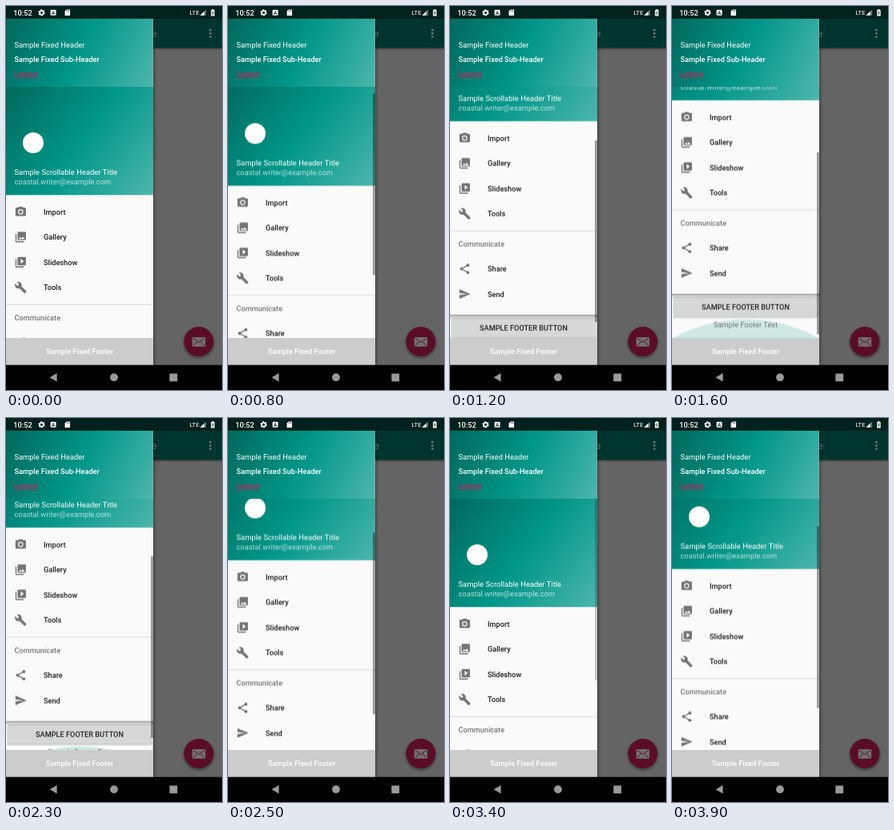
Recreate the animation shown at these times as an HTML page. Size 270 by 480 pixels, loop 4.1 s.

```html
<!DOCTYPE html>
<html lang="en">
<head>
<meta charset="utf-8">
<title>Navigation drawer</title>
<style>
  html, body { margin: 0; width: 100%; height: 100%; overflow: hidden; background: #000; }
  svg { display: block; width: 270px; height: 480px; font: 400 9.3px Roboto, Arial, sans-serif; }
  .med { font-weight: 500; font-size: 9.2px; }
  .mid { text-anchor: middle; }
  .link { text-decoration: underline; text-decoration-thickness: 1px; text-underline-offset: .6px; }
</style>
</head>
<body>
<svg viewBox="0 0 270 480" xmlns="http://www.w3.org/2000/svg">
  <defs>
    <linearGradient id="fixedFill" gradientUnits="userSpaceOnUse" x1="0" y1="16" x2="184" y2="101">
      <stop offset="0" stop-color="#00695c"/><stop offset=".5" stop-color="#009688"/><stop offset="1" stop-color="#4db6ac"/>
    </linearGradient>
    <linearGradient id="headFill" gradientUnits="userSpaceOnUse" x1="0" y1="101" x2="184" y2="236">
      <stop offset="0" stop-color="#00695c"/><stop offset=".5" stop-color="#009688"/><stop offset="1" stop-color="#4db6ac"/>
    </linearGradient>
    <linearGradient id="fade" x1="0" y1="0" x2="0" y2="1">
      <stop offset="0" stop-opacity=".36"/><stop offset="1" stop-opacity="0"/>
    </linearGradient>
    <linearGradient id="edge">
      <stop offset="0" stop-opacity=".28"/><stop offset="1" stop-opacity="0"/>
    </linearGradient>
    <radialGradient id="glow">
      <stop offset=".8" stop-opacity=".35"/><stop offset="1" stop-opacity="0"/>
    </radialGradient>
    <clipPath id="view"><rect y="101" width="183.75" height="314"/></clipPath>
  </defs>

  <!-- dimmed screen -->
  <rect y="15.75" width="270" height="434" fill="#646464"/>
  <rect y="15.75" width="270" height="36.75" fill="#00352f"/>
  <rect y="52.5" width="270" height="3" fill="url(#fade)"/>
  <text x="188.5" y="39" fill="#666" text-anchor="end" style="font-size:13.1px;font-weight:500">e</text>
  <g fill="#707a78">
    <circle cx="255.5" cy="30.2" r="1.35"/><circle cx="255.5" cy="34.4" r="1.35"/><circle cx="255.5" cy="38.6" r="1.35"/>
  </g>
  <circle cx="241" cy="421" r="21.5" fill="url(#glow)"/>
  <circle cx="241" cy="419.4" r="18.4" fill="#5a0c28"/>
  <rect x="232.8" y="414" width="16.5" height="11.8" rx="1" fill="#707070"/>
  <path d="M234 415.4l7 5 7-5M234 424.8l4.6-5M248 424.8l-4.6-5" fill="none" stroke="#5a0c28" stroke-width="1"/>

  <!-- drawer -->
  <rect x="183.75" y="15.75" width="5" height="433" fill="url(#edge)"/>
  <rect y="15.75" width="183.75" height="433" fill="#fafafa"/>
  <g clip-path="url(#view)">
    <g id="page">
      <circle cx="92" cy="700" r="190" fill="#cfe8e4"/>
      <text class="mid" x="92" y="519.8" fill="#757575">Sample Footer Text</text>
      <rect x="1" y="483" width="182" height="26" rx="2" fill="#000" opacity=".1"/>
      <rect x="2" y="482.5" width="180" height="24.5" rx="1.5" fill="#000" opacity=".14"/>
      <rect x="2" y="482" width="180" height="24" rx="1.5" fill="#d6d7d7"/>
      <text class="med mid" x="92" y="497.7" fill="#212121">SAMPLE FOOTER BUTTON</text>
      <rect y="478" width="184" height="6" fill="url(#fade)"/>
      <rect y="236" width="184" height="242" fill="#fafafa"/>
      <rect y="101" width="184" height="135.3" fill="url(#headFill)"/>
      <circle cx="34" cy="171" r="13" fill="#fff"/>
      <text x="10.5" y="210.6" fill="#fff" style="font-size:9.45px">Sample Scrollable Header Title</text>
      <text x="10.5" y="223.2" fill="#fff" fill-opacity=".72">coastal.writer@example.com</text>
      <rect y="372.8" width="184" height=".8" fill="#d2d2d2"/>
      <text class="med" x="10.5" y="392.9" fill="#757575">Communicate</text>
      <g id="rows"></g>
    </g>
    <rect id="bar" x="181" y="101" width="3" height="227" fill="#000" fill-opacity=".36"/>
  </g>

  <rect y="15.75" width="183.75" height="85.25" fill="url(#fixedFill)"/>
  <g fill="#fff">
    <text x="10.5" y="52">Sample Fixed Header</text>
    <text class="med" x="10.5" y="69.8">Sample Fixed Sub-Header</text>
  </g>
  <text class="med link" x="10.5" y="88.4" fill="#bc2460">Logout</text>
  <rect y="415" width="183.75" height="34" fill="#ccc"/>
  <text class="med mid" x="92" y="435.3" fill="#fff">Sample Fixed Footer</text>

  <!-- system bars -->
  <rect width="270" height="15.75" fill="#00211c"/>
  <g fill="#fff">
    <text class="med" x="9.3" y="11.8">10:52</text>
    <circle cx="44.5" cy="8.3" r="2.5" fill="none" stroke="#fff" stroke-width="1.7"/>
    <circle cx="44.5" cy="8.3" r="3.6" fill="none" stroke="#fff" stroke-width="1.2" stroke-dasharray="1.9 1.87"/>
    <rect x="55.6" y="4.8" width="7" height="7" rx="1"/>
    <path d="M75.6 4.4h4.5v7.6h-6.5v-5.4z"/>
    <text x="229.4" y="11.2" style="font-size:7.9px">LTE</text>
    <path d="M242.6 11.8h7.6v-7.6z" opacity=".4"/>
    <path d="M242.6 11.8h5v-5z"/>
    <path d="M256.3 5h1.2v-1h2v1h1.2v7.4h-4.4z"/>
  </g>
  <path d="M57.1 10.8l2-4.2 2 4.2M57.8 9.6h2.6" fill="none" stroke="#00211c" stroke-width=".8"/>
  <path d="M75.9 5.4v1.6M77.4 5.4v1.6M78.8 5.4v1.6" stroke="#00211c" stroke-width=".6"/>
  <path d="M259 6.1l-1.4 2.6h1.8l-1.2 2.6" fill="none" stroke="#00211c" stroke-width=".7"/>
  <rect y="448.7" width="270" height="31.3"/>
  <g fill="#999">
    <path d="M54.6 464.2l9-5.2v10.4z"/>
    <circle cx="135" cy="464.2" r="4.9"/>
    <rect x="204.4" y="459.4" width="9.8" height="9.8" rx=".6"/>
  </g>
</svg>

<script>
const LOOP = 4100;

const stack = 'M4 6H2v14a2 2 0 0 0 2 2h14v-2H4zM8 2h12a2 2 0 0 1 2 2v12a2 2 0 0 1-2 2H8a2 2 0 0 1-2-2V4a2 2 0 0 1 2-2z';
const fill = d => `<path fill-rule="evenodd" d="${d}"/>`;
const dot = (x, y, r) => `<circle cx="${x}" cy="${y}" r="${r}"/>`;
const icons = {
  Import: fill('M9 2L7.2 4H4a2 2 0 0 0-2 2v12a2 2 0 0 0 2 2h16a2 2 0 0 0 2-2V6a2 2 0 0 0-2-2h-3.2L15 2zM12 7a5 5 0 0 1 0 10a5 5 0 0 1 0-10z') + dot(12, 12, 3.2),
  Gallery: fill(stack + 'M11 12l2 2.7L16 11l4 5H8z'),
  Slideshow: fill(stack + 'M12 14.5v-9l6 4.5z'),
  Tools: fill('M22.7 19l-9.1-9.1c.9-2.3.4-5-1.5-6.9-2-2-5-2.4-7.4-1.3L9 6 6 9 1.6 4.7C.4 7.1.9 10.1 2.9 12.1c1.9 1.9 4.6 2.4 6.9 1.5l9.1 9.1c.4.4 1 .4 1.4 0l2.3-2.3c.5-.4.5-1.1.1-1.4z'),
  Share: dot(18, 5, 3) + dot(6, 12, 3) + dot(18, 19, 3) + '<path d="M18 5L6 12l12 7" fill="none" stroke="#757575" stroke-width="2"/>',
  Send: fill('M2 21l21-9L2 3v7l15 2-15 2z')
};
const rowY = { Import: 257.4, Gallery: 288.9, Slideshow: 320.4, Tools: 351.9, Share: 420.8, Send: 452.3 };

document.getElementById('rows').innerHTML = Object.keys(rowY).map(name => `
  <g transform="translate(10.5 ${rowY[name] - 7.9}) scale(.656)" fill="#757575">${icons[name]}</g>
  <text class="med" x="47" y="${rowY[name] + 3.3}" fill="#1c1c1c">${name}</text>`).join('');

// [time, scroll distance]
const scroll = [
  [0, 0], [800, 11.6], [900, 45], [1000, 78],
  [1200, 92.3], [1300, 101], [1400, 108], [1500, 114], [1600, 118.4], [1700, 119], [1800, 119.3],
  [2200, 112], [2300, 99.3], [2400, 79], [2500, 58.5], [2600, 38], [2700, 18.3], [2800, 0],
  [3800, 14], [3900, 47.5]
];
// [time, scrollbar opacity]
const shown = [[0, 0], [800, 1], [2000, 0], [2200, 1], [3400, .5], [3500, 0], [3800, 1]];

const thumbY = s => s * .725 - Math.max(0, s - 100) * .2;
const start = document.timeline.currentTime || 0;

function play(id, steps, style) {
  const last = steps[steps.length - 1][1];
  const frames = [...steps, [LOOP, last]]
    .map(([t, v]) => ({ offset: t / LOOP, easing: 'step-end', ...style(v) }));
  document.getElementById(id)
    .animate(frames, { duration: LOOP, iterations: Infinity })
    .startTime = start;
}

play('page', scroll, s => ({ transform: `translateY(${-s}px)` }));
play('bar', scroll, s => ({ transform: `translateY(${thumbY(s)}px)` }));
play('bar', shown, o => ({ opacity: o }));
</script>
</body>
</html>
```
